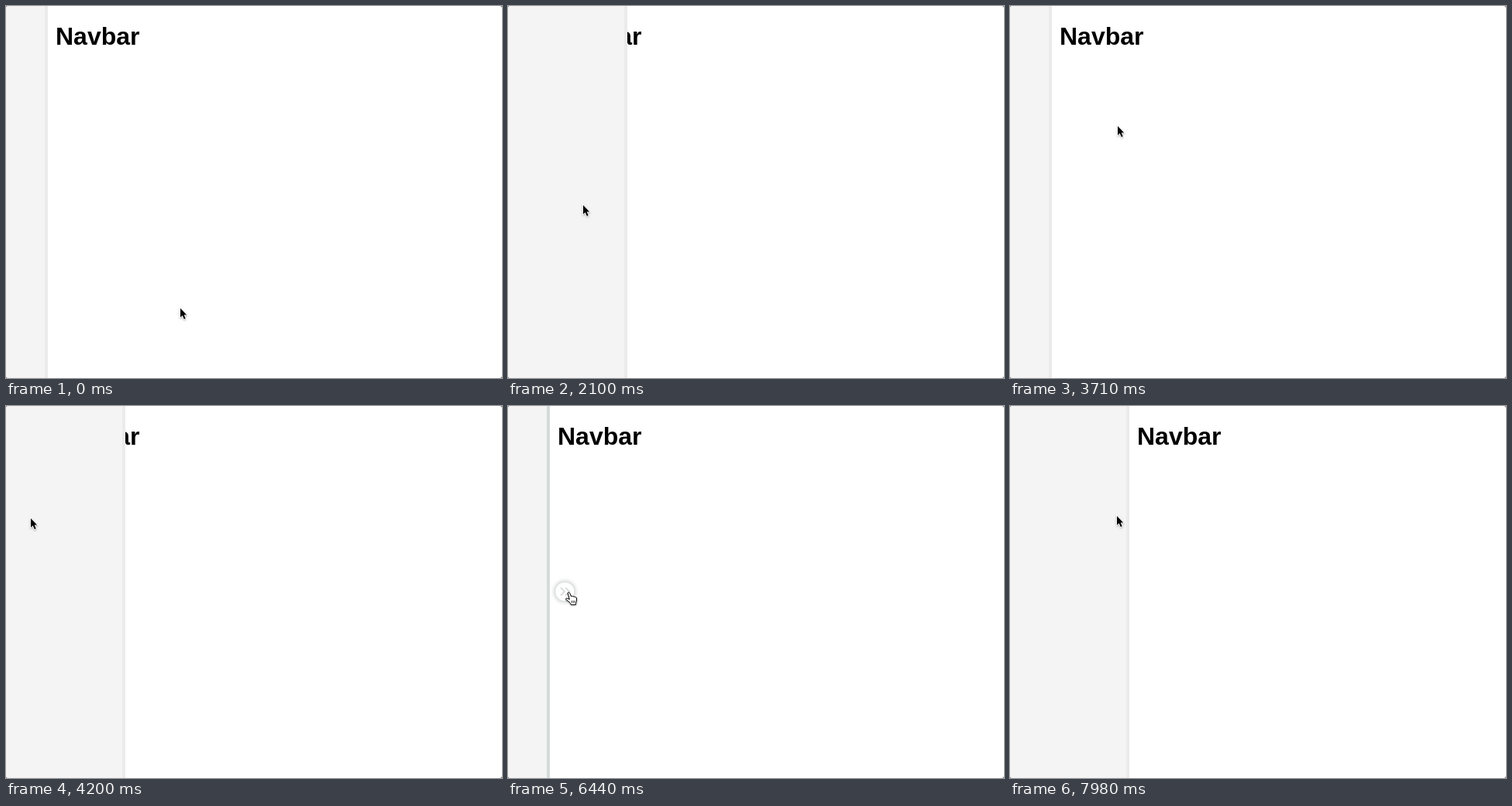
Write an HTML page that moves like this. It is 640x480 px and loops after 8 s.

```html
<!DOCTYPE html>
<html lang="en">
<head>
<meta charset="utf-8">
<title>Navbar</title>
<style>
  html, body { margin: 0; width: 100%; height: 100%; overflow: hidden; background: #666; }
  svg { display: block; width: 640px; height: 480px; border-radius: 3px; background: #fff; }
  text { font: bold 32px "Liberation Sans", Arial, sans-serif; }
  #arrow, #hand { filter: drop-shadow(0 1px 1px rgba(0, 0, 0, .3)); }
</style>
</head>
<body>
<svg viewBox="0 0 640 480">
  <defs>
    <radialGradient id="halo">
      <stop offset=".72" stop-opacity=".09"/>
      <stop offset="1" stop-opacity="0"/>
    </radialGradient>
  </defs>
  <text id="title" y="50">Navbar</text>
  <rect id="panel" height="480" fill="#f4f4f4"/>
  <rect id="edge" width="4" height="480"/>
  <g id="button">
    <circle r="18" fill="url(#halo)"/>
    <circle r="12.8" fill="#fff" stroke="#dce0df" stroke-width="1.5"/>
    <path d="M-5.3-5 -.3 0-5.3 5M1-5 6 0 1 5" fill="none" stroke="#d2d6d5" stroke-width="1.7"/>
  </g>
  <circle id="ring" r="28.5" fill="none" stroke="#000" stroke-opacity=".6" stroke-width="3"/>
  <path id="arrow" d="M0 0V11.7L2.7 9.2 4.8 14 6.7 13.2 4.7 8.5H8.2Z"
        stroke="#fff" stroke-width="1.6" paint-order="stroke"/>
  <g id="hand" stroke="#000" stroke-linejoin="round">
    <path fill="#fff" d="M.2 1.7C0 .3 2 0 2.6 1.2L4.6 6C5 4.9 6.8 5 7 6.2 7.6 5.4 9 5.7 9.2 6.8
      10 6.2 11.4 6.6 11.5 8L11.6 11C11.5 13 10.5 14 10.4 16.3H4.2C3.8 14 1 12-2.2 9.8
      -3 8.6-1.6 7.6-.3 8.4L2.4 9.4Z"/>
    <path d="M5.3 11.2V14M7.3 11.2V14M9.2 11.2V14" stroke-width=".8"/>
  </g>
</svg>
<script>
const LOOP = 8000, STEP = 70, CLOSED = 50, OPEN = 150;
const $ = id => document.getElementById(id);
const place = (el, x, y) => el.setAttribute('transform', `translate(${x} ${y})`);
const show = (id, on) => $(id).setAttribute('visibility', on ? 'visible' : 'hidden');
const ramp = (t, start, end) => Math.min(1, Math.max(0, (t - start) / (end - start)));
const smooth = u => u * u * (3 - 2 * u);
const within = (t, from, to) => t >= from && t < to;

// The pointer glides between rests; lift bends a glide upwards
const home = { x: 225, y: 390 };
const glides = [
  { from: 0, to: 770, x: 34, y: 263 },
  { from: 1750, to: 2660, x: 224, y: 262, lift: 7 },
  { from: 2870, to: 3150, x: 185, y: 160 },
  { from: 3430, to: 4200, x: 32, y: 145 },
  { from: 4760, to: 5530, x: 218, y: 144 },
  { from: 5600, to: 6440, x: 77, y: 240 },
  { from: 7350, to: 7980, x: 138, y: 142 }
];

function pointer(t) {
  let { x, y } = home;
  for (const glide of glides) {
    const s = smooth(ramp(t, glide.from, glide.to));
    x += (glide.x - x) * s;
    y += (glide.y - y) * s - (glide.lift || 0) * Math.sin(Math.PI * s);
  }
  return [Math.round(x), Math.round(y)];
}

// CSS "ease": cubic-bezier(.25, .1, .25, 1)
function ease(x) {
  let low = 0, high = 1;
  for (let n = 0; n < 20; n++) {
    const u = (low + high) / 2;
    if (.75 * u * (1 - u) + u ** 3 < x) low = u; else high = u;
  }
  return .3 * low * (1 - low) ** 2 + 3 * low * low * (1 - low) + low ** 3;
}
const slide = (t, start) => ease(ramp(t, start, start + 300));
const fade = (t, start) => ramp(t, start, start + 200);

function draw(t) {
  const pinned = slide(t, 6910);
  const open = slide(t, 1660) - slide(t, 2290) + slide(t, 3890) - slide(t, 5195) + pinned;
  const width = Math.round(CLOSED + (OPEN - CLOSED) * open);
  $('panel').setAttribute('width', width);
  $('edge').setAttribute('x', width);
  $('title').setAttribute('x', 64 + Math.round((OPEN - CLOSED) * pinned));

  const shown = fade(t, 2330) - fade(t, 2920) + fade(t, 5220) - fade(t, 6900);
  const buttonX = width + 23.3, buttonY = 239.5;
  $('button').setAttribute('opacity', shown);
  place($('button'), buttonX, buttonY);

  const [x, y] = pointer(t);
  const pointing = shown > 0 && Math.hypot(x - buttonX, y - buttonY) < 15;
  $('edge').setAttribute('fill', pointing ? '#d5dbda' : '#ebebeb');
  for (const id of ['arrow', 'hand', 'ring']) place($(id), x, y);
  show('arrow', !pointing);
  show('hand', pointing);
  show('ring', within(t, 910, 1050) || within(t, 6720, 6930));
}

function tick() {
  draw(Math.floor(performance.now() % LOOP / STEP) * STEP);
  requestAnimationFrame(tick);
}
tick();
</script>
</body>
</html>
```
